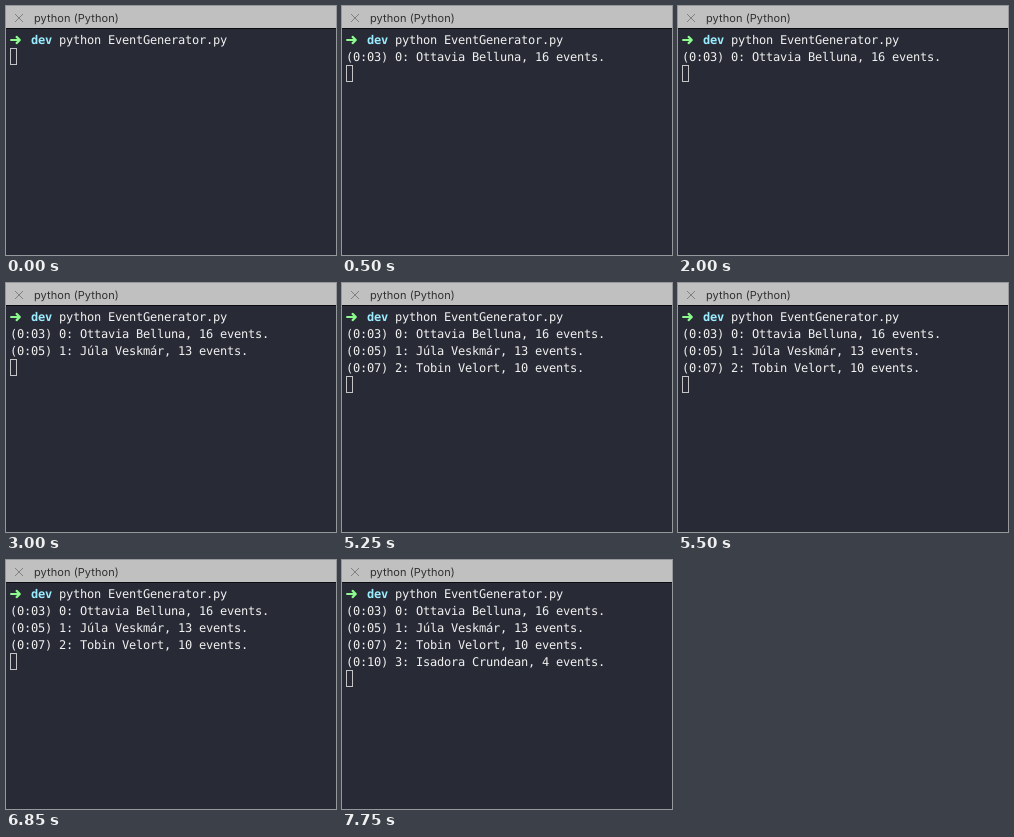
Recreate the animation shown at these times as an HTML page. Size 330 by 249 pixels, loop 8 s.

```html
<!DOCTYPE html>
<html lang="en">
<head>
<meta charset="utf-8">
<title>Terminal</title>
<style>
  html, body { margin: 0; width: 100%; height: 100%; overflow: hidden; background: #282a36; }
  svg { display: block; width: 100vw; height: 100vh; }
  text { text-rendering: geometricPrecision; }
  .title { font: 11px Inter, "Open Sans", sans-serif; letter-spacing: 0.07px; fill: #303030; }
  .term { font: 12px "DejaVu Sans Mono", monospace; letter-spacing: -0.224px; fill: #f1f1f0; }
  .dir { font-weight: bold; fill: #9aedfe; }
  .arrow { fill: none; stroke: #8dfa8e; stroke-width: 2.2; stroke-linecap: round; stroke-linejoin: round; }
</style>
</head>
<body>
<svg viewBox="0 0 330 249">
  <rect width="330" height="249" fill="#282a36"/>
  <rect width="330" height="22" fill="#c1c0c1"/>
  <rect y="22" width="330" height="1" fill="#0c0c10"/>
  <path d="M9 8l8 8m0-8l-8 8" stroke="#808080" fill="none"/>
  <text class="title" x="28" y="16">python (Python)</text>
  <path class="arrow" d="M5.1 34h8.6M10.6 30.9l3.2 3.1-3.2 3.1"/>
  <g class="term" id="term">
    <text class="dir" x="25" y="38">dev</text>
    <text x="53" y="38">python EventGenerator.py</text>
  </g>
  <rect id="cursor" x="4.5" y="42.5" width="6" height="16" fill="none" stroke="#c4c4c6"/>
</svg>
<script>
const LOOP = 8000, ROW = 17;
const log = [
  [500, "(0:03) 0: Ottavia Belluna, 16 events."],
  [3000, "(0:05) 1: Júla Veskmár, 13 events."],
  [5250, "(0:07) 2: Tobin Velort, 10 events."],
  [7750, "(0:10) 3: Isadora Crundean, 4 events."]
];
const term = document.getElementById("term");
const cursor = document.getElementById("cursor");

const lines = log.map(([at, text], i) => {
  const el = document.createElementNS("http://www.w3.org/2000/svg", "text");
  el.setAttribute("x", 4);
  el.setAttribute("y", 55 + i * ROW);
  el.textContent = text;
  term.append(el);
  return { at, el };
});

function draw(t) {
  let shown = 0;
  for (const { at, el } of lines) {
    const on = t >= at;
    el.setAttribute("visibility", on ? "visible" : "hidden");
    shown += on;
  }
  cursor.setAttribute("y", 42.5 + shown * ROW);
}

const start = performance.now();
function tick() {
  draw((performance.now() - start) % LOOP);
  requestAnimationFrame(tick);
}
tick();
</script>
</body>
</html>
```
